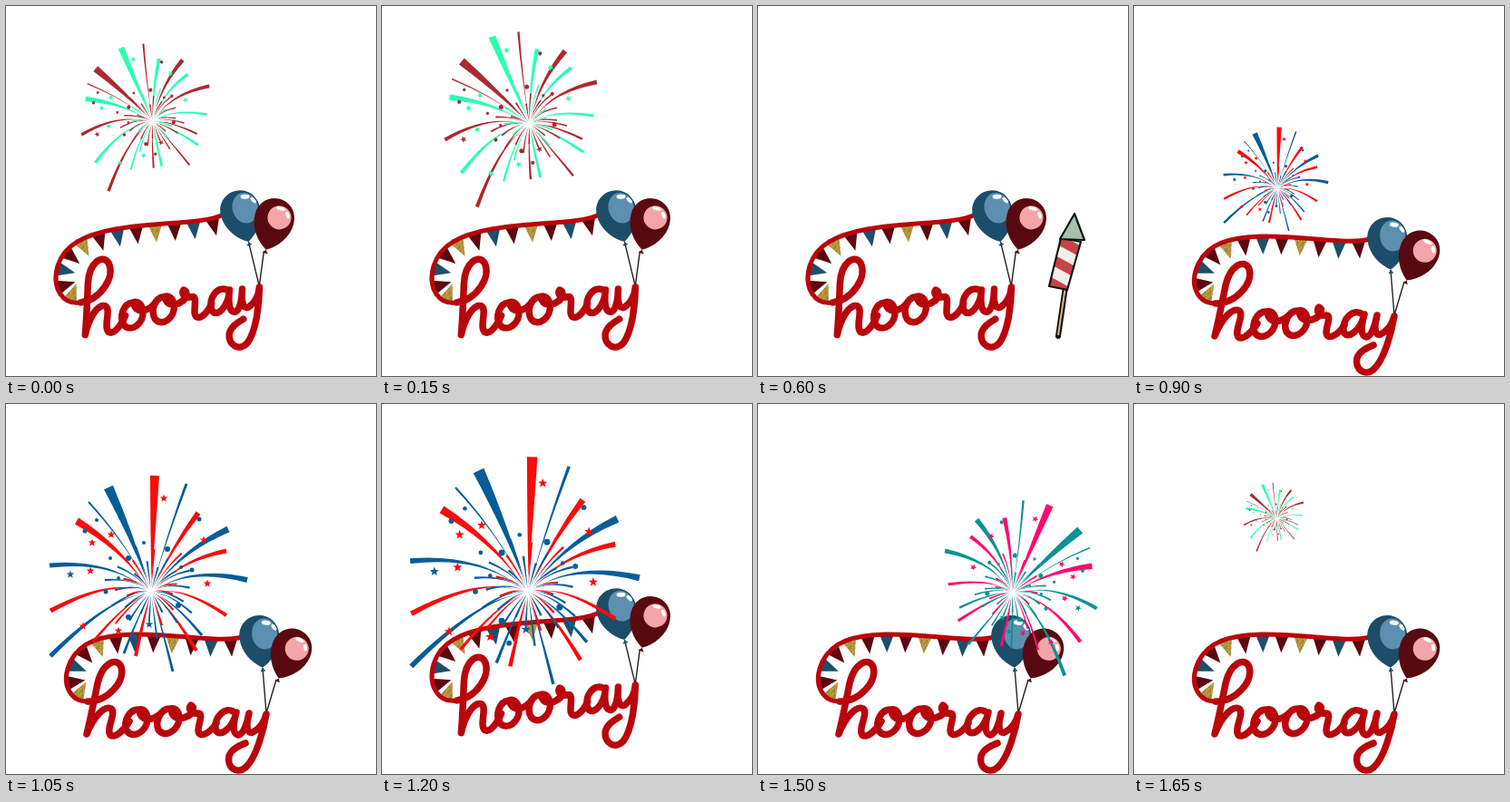
These frames come from a looping animation (408 by 408 pixels, 1800 ms). An HTML page:

```html
<!DOCTYPE html>
<html>
<head>
<meta charset="utf-8">
<style>
  html, body { margin: 0; width: 100%; height: 100%; overflow: hidden; background: #fff; }
  svg { display: block; width: 100vw; height: 100vh; }
  .script { fill: none; stroke: #b9060c; stroke-width: 7.5; stroke-linecap: round; stroke-linejoin: round; }
  .ink { stroke: #111; stroke-width: 2.2; stroke-linejoin: round; }
  .a { fill: var(--a); }
  .b { fill: var(--b); }
</style>
</head>
<body>
<svg viewBox="0 0 408 408">
  <defs>
    <pattern id="gold" width="6" height="6" patternUnits="userSpaceOnUse">
      <rect width="6" height="6" fill="#ae9139"/>
      <path d="M1 1h1M4 2h1M2 4h1" stroke="#dcc878"/>
      <path d="M3 0h1M0 3h1M5 5h1" stroke="#83692a"/>
    </pattern>
    <path id="skin" d="M0 29C-12 22-22 9-22-6C-22-20-12-29 0-29C12-29 22-20 22-6C22 9 12 22 0 29l-3 4h6z"/>
    <path id="o" d="M147 337C136 336 129 350 133 360C139 370 155 362 156 348C156 340 152 336 147 337C148 350 160 350 170 342"/>
    <clipPath id="tube"><path d="M334 256L356 260L341 313L321 309Z"/></clipPath>
  </defs>

  <g id="banner">
    <g id="flags"></g>
    <path id="rope" class="script" style="stroke-width:5" d="M260 257C235 264 190 253 140 254C105 255 82 262 71 284C60 308 70 328 90 328"/>
    <g fill="none" stroke="#222" stroke-width="1.4"><path d="M283 291L287 341L298 304"/></g>
    <g transform="translate(280 262) rotate(-6)">
      <use href="#skin" fill="#1c4d69"/>
      <ellipse cx="6" cy="-8" rx="14" ry="17" fill="#5c8fb0"/>
      <ellipse cx="9" cy="-20" rx="5" ry="2.5" fill="#fff" transform="rotate(12 9 -20)"/>
      <ellipse cx="17" cy="-14" rx="2" ry="4" fill="#fff" transform="rotate(-30 17 -14)"/>
    </g>
    <g transform="translate(312.500 276) rotate(24)">
      <use href="#skin" fill="#590a10"/>
      <ellipse cx="5" cy="-9" rx="13" ry="13" fill="#f5a5a9"/>
      <ellipse cx="4" cy="-19" rx="5" ry="2" fill="#fff"/>
      <ellipse cx="13" cy="-14" rx="2" ry="4" fill="#fff" transform="rotate(-35 13 -14)"/>
    </g>
    <g class="script">
      <path d="M90 328C112 328 132 306 127 290C122 278 106 286 101 308C97 328 93 348 89 364C96 346 108 332 116 336C122 341 110 358 115 365C120 369 130 360 136 350"/>
      <use href="#o"/>
      <use href="#o" x="35" y="-1"/>
      <path d="M201 344C207 340 208 334 204 332C200 336 204 342 212 341C218 341 212 353 212 360C213 369 224 364 232 352"/>
      <path d="M252 340C242 332 229 346 231 358C234 370 250 358 254 340C250 354 250 364 256 365C262 364 266 352 268 341C264 356 266 364 272 362C280 358 285 350 287 342C284 360 276 390 264 401C254 409 243 400 246 388C249 380 257 377 264 374"/>
    </g>
  </g>

  <g id="rocket">
    <path d="M346 262L331 364" stroke="#111" stroke-width="6" stroke-linecap="round"/>
    <path d="M346 262L331 363" stroke="#d9b48c" stroke-width="2"/>
    <g clip-path="url(#tube)">
      <rect x="315" y="250" width="50" height="70" fill="#f4efe6"/>
      <path d="M325 254L365 276M318 276L358 298M310 298L350 320" stroke="#ca4249" stroke-width="11"/>
    </g>
    <path class="ink" fill="none" d="M334 256L356 260L341 313L321 309Z"/>
    <path class="ink" fill="#a8c0ae" d="M349 229L333 257L360 258Z"/>
  </g>

  <g id="burst"></g>
</svg>
<script>
const $ = id => document.getElementById(id);
const STEP = 150, STEPS = 12;

const rope = $('rope');
const flagFills = ['#5b0910', '#1d4f6c', '#5b0910', 'url(#gold)'];
const flagGap = rope.getTotalLength() / 12.2;
$('flags').innerHTML = Array.from({ length: 12 }, (_, i) => {
  const at = (i + 0.6) * flagGap;
  const p = rope.getPointAtLength(at - 8), q = rope.getPointAtLength(at + 8);
  const dx = (q.x - p.x) / 16, dy = (q.y - p.y) / 16;
  const tipX = (p.x + q.x) / 2 + dy * 20, tipY = (p.y + q.y) / 2 - dx * 20;
  return `<path fill="${flagFills[i % 4]}" d="M${p.x} ${p.y}L${q.x} ${q.y}L${tipX} ${tipY}Z"/>`;
}).join('');

// A tapered streak from the centre that droops towards its tip.
function streak(x, y, w, cls) {
  const cx = 0.45 * x, cy = 0.45 * y - 0.2 * Math.abs(x);
  const len = Math.hypot(x - cx, y - cy);
  const nx = -(y - cy) / len * w / 2, ny = (x - cx) / len * w / 2;
  return `<path class="${cls}" d="M${cx / 4} ${cy / 4}Q${cx + nx / 2} ${cy + ny / 2} ${x + nx} ${y + ny}
    L${x - nx} ${y - ny}Q${cx - nx / 2} ${cy - ny / 2} ${cx / 4} ${cy / 4}Z"/>`;
}

function star(x, y, r, cls) {
  const points = Array.from({ length: 10 }, (_, i) => {
    const radius = i % 2 ? r * 0.42 : r, angle = i * Math.PI / 5;
    return [x + radius * Math.sin(angle), y - radius * Math.cos(angle)];
  });
  return `<polygon class="${cls}" points="${points.join(' ')}"/>`;
}

const streaks = [
  [-47, -116, 11], [4, -129, 10], [39, -120, 3], [52, -88, 6], [85, -70, 7], [83, -46, 5], [106, -14, 6],
  [83, 25, 4], [56, 47, 3], [50, 64, 4], [24, 87, 3], [-17, 70, 4], [-30, 67, 3], [-64, 54, 3],
  [-111, 70, 5], [-111, 20, 5], [-112, -30, 5], [-82, -79, 8], [-69, -100, 2]
];
const stars = [[14, -104], [-65, -55], [-67, -24], [-44, -64], [58, -58], [62, -10], [-75, 37], [-36, 42], [-89, -20], [-2, 35]];
const dots = [[-60, -80], [-73, -68], [-25, -38], [-45, -38], [-50, -1], [-25, 27], [33, -28], [53, -81], [30, 14], [-8, -55], [45, -25], [18, -48], [-36, -16], [-18, 48]];

let sparks = streaks.map(([x, y, w], i) => streak(x, y, w, i % 2 ? 'b' : 'a')).join('');
for (let i = 0; i < 32; i++) {
  const angle = i * Math.PI / 16 + 0.07, r = 24 + i * 13 % 32;
  sparks += streak(r * Math.cos(angle), r * Math.sin(angle), 2.2, i % 3 ? 'a' : 'b');
}
sparks += stars.map(([x, y], i) => star(x, y, 4.6, i < 8 ? 'b' : 'a')).join('');
sparks += dots.map(([x, y], i) => `<circle class="a" cx="${x}" cy="${y}" r="${2 + i % 3 * 0.5}"/>`).join('');
$('burst').innerHTML = sparks;

const crimson = { a: '#ad2a2e', b: '#2bffb1', flip: 1, turn: 25 };
const navy = { a: '#075d99', b: '#fb0b0b', flip: 1, turn: 0 };
const teal = { a: '#0b9294', b: '#ff0a70', flip: -1, turn: 25 };
const bursts = {
  0: [crimson, 162, 128, 0.69], 1: [crimson, 163, 131, 0.82],
  6: [navy, 158, 202, 0.53], 7: [navy, 160, 208, 1], 8: [navy, 161, 208, 1.16],
  9: [teal, 281, 207, 0.69], 10: [teal, 280, 209, 0.82], 11: [crimson, 158, 127, 0.322]
};
const tilted = 'rotate(9) scale(.95) translate(-349 -229)';
const rockets = {
  2: 'translate(345 282) ' + tilted, 3: 'translate(351 256) ' + tilted,
  4: 'translate(0 0)', 5: 'translate(0 -25)'
};

function place(element, transform) {
  element.style.display = transform ? '' : 'none';
  if (transform) element.setAttribute('transform', transform);
}

function draw() {
  const step = Math.floor(performance.now() / STEP) % STEPS;
  const raised = Math.floor(step / 2) % 2 === 0;
  place($('banner'), raised ? 'translate(260 232) rotate(-9) translate(-280 -262)' : 'translate(0 0)');
  place($('rocket'), rockets[step]);
  const burst = $('burst');
  if (bursts[step]) {
    const [look, x, y, size] = bursts[step];
    burst.style.setProperty('--a', look.a);
    burst.style.setProperty('--b', look.b);
    place(burst, `translate(${x} ${y}) scale(${look.flip * size} ${size}) rotate(${-look.turn})`);
  } else {
    place(burst, null);
  }
  requestAnimationFrame(draw);
}
draw();
</script>
</body>
</html>
```
